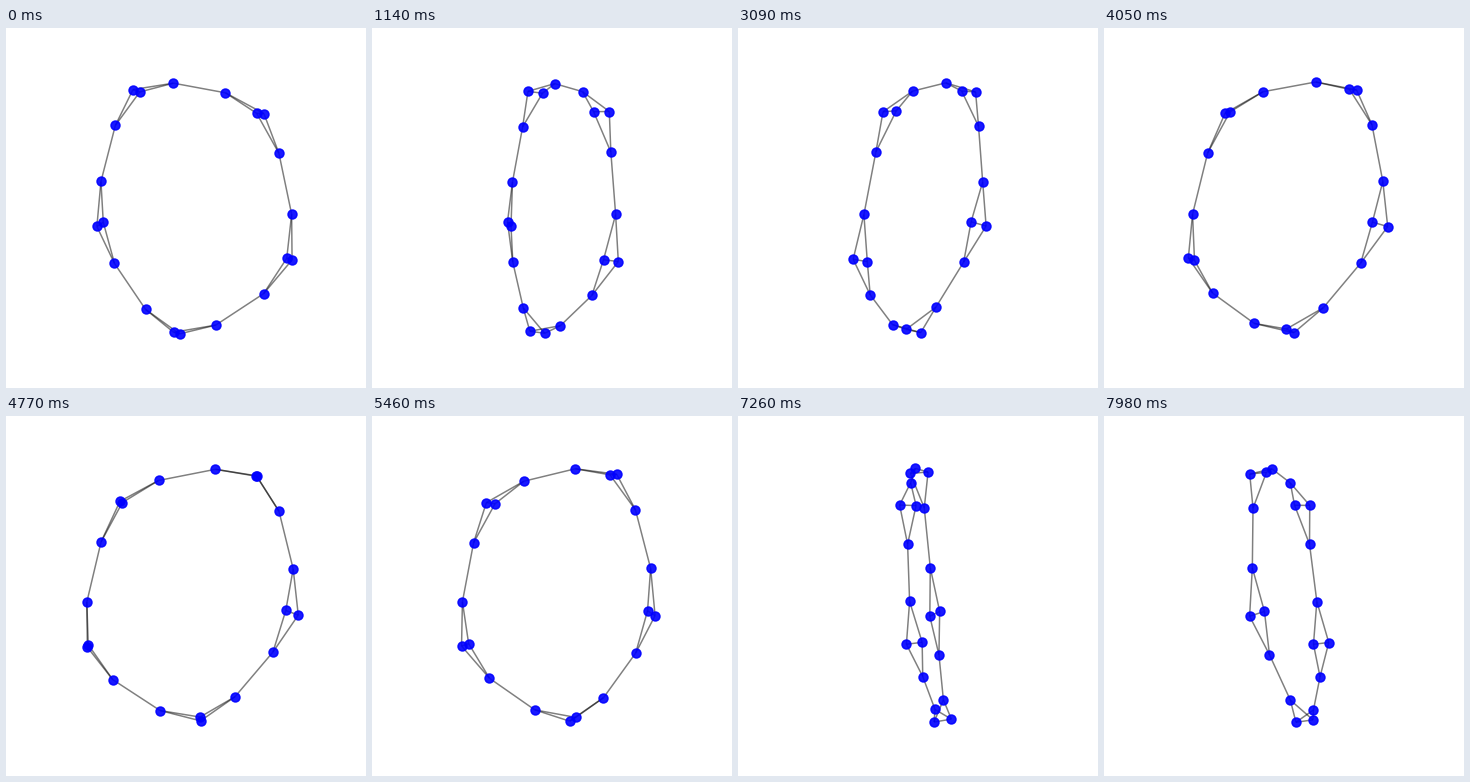
A matplotlib script that plays this animation: 360 by 360 pixels, repeating every 8 s.

```python
import numpy as np
import matplotlib.pyplot as plt
from matplotlib.animation import FuncAnimation
from matplotlib.collections import LineCollection

SIZE = 360
CENTER = np.array([185.5, 176.0])
DIST = 1946.0      # camera distance in pixels
TICK = 10          # ms per drawn frame
STEP = 30          # ms per degree of rotation
LOOP = 8000

# Ring of five diamonds: (across, deep, down) for each node, clockwise.
NODES = np.array([
    (-77.7, 40.5, -80.3), (-59.3, 26.5, -116), (-52.8, 42.4, -114.5), (-18.3, 18.8, -122),
    (33.9, -3.2, -111), (64.3, -25.5, -89.5), (72.0, -10.3, -90), (86.2, -27.0, -50),
    (98.3, -35.7, 10), (92.9, -47.8, 53), (98.9, -32.2, 55), (70.7, -36.7, 88),
    (23.9, -26.0, 119.5), (-11.9, -5.6, 129.5), (-17.7, -22.1, 126.8), (-46.0, 2.4, 105.5),
    (-78.0, 24.7, 60.2), (-96.8, 44.7, 23), (-89.6, 30.2, 18.5), (-92.5, 41.9, -23),
])


def ring_edges(diamonds):
    edges = []
    for k in range(diamonds):
        a, b, c, d = range(4 * k, 4 * k + 4)
        edges += [(a, b), (a, c), (b, c), (b, d), (c, d), (d, (d + 1) % (4 * diamonds))]
    return np.array(edges)


EDGES = ring_edges(5)


def project(degrees):
    """Turn the ring about its vertical axis; return screen points and nearness."""
    t = np.radians(degrees)
    x, z, y = NODES.T
    across = x * np.cos(t) + z * np.sin(t)
    near = x * np.sin(t) - z * np.cos(t)
    scale = DIST / (DIST - near)
    return CENTER + np.column_stack([across, y]) * scale[:, None], near


fig = plt.figure(figsize=(SIZE / 72, SIZE / 72), dpi=72, facecolor="white")
ax = fig.add_axes([0, 0, 1, 1])
ax.set_xlim(0, SIZE)
ax.set_ylim(SIZE, 0)
ax.axis("off")

lines = LineCollection([], colors="black", alpha=0.5, linewidths=1.5, zorder=1)
ax.add_collection(lines)
start, _ = project(0)
dots = ax.scatter(*start.T, s=80, color="blue", alpha=0.9, linewidths=1.5, zorder=2)


def update(i):
    points, near = project(i * TICK // STEP)
    lines.set_segments(points[EDGES])
    dots.set_offsets(points[np.argsort(near)])
    return lines, dots


def init():
    return update(0)


anim = FuncAnimation(fig, update, frames=LOOP // TICK, init_func=init,
                     interval=TICK, repeat=True, repeat_delay=0)
plt.show()
```
